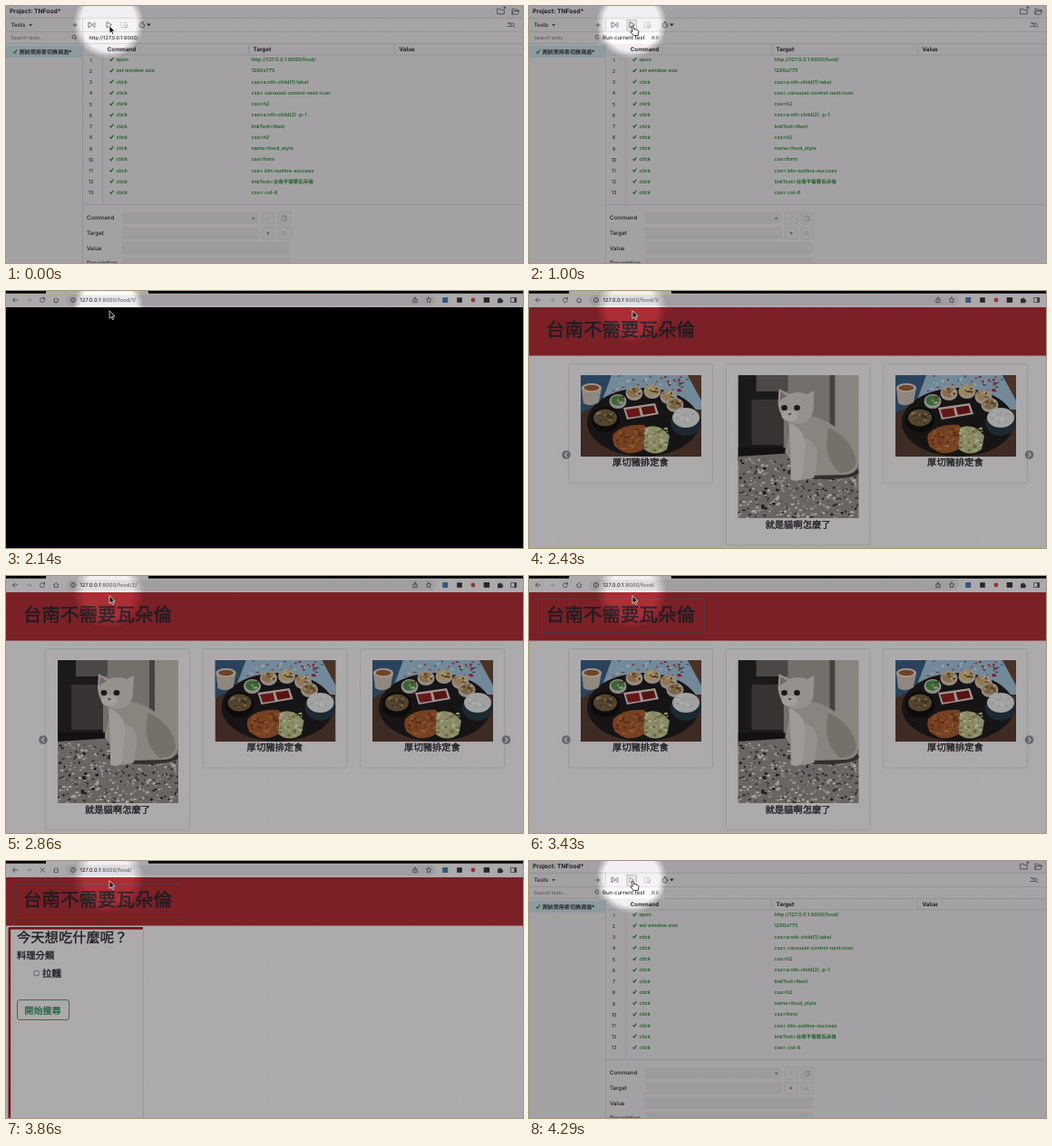
These frames come from a looping animation (570x284 px, 5.01 s). An HTML page:

```html
<!DOCTYPE html>
<html lang="zh-Hant">
<head>
<meta charset="utf-8">
<title>Test run</title>
<style>
html, body { margin: 0; width: 100%; height: 100%; overflow: hidden; background: #000; }
svg { display: block; width: 570px; height: 284px; }
text { font-family: Inter, "Noto Sans CJK TC", "Noto Sans CJK", sans-serif; fill: #2c2b31; white-space: pre; text-rendering: geometricPrecision; }
.heavy { stroke: #2c2b31; stroke-width: .35; }
.line { fill: none; stroke: #55535a; stroke-width: .75; stroke-linecap: round; stroke-linejoin: round; }
.rule { stroke: #cfcdd0; stroke-width: .7; }
</style>
</head>
<body>
<svg id="stage" viewBox="0 0 570 284"></svg>
<script>
const LOOP = 5010;
const SITE = '台南不需要瓦朵倫';

const text = (x, y, size, str, attrs = '') => `<text x="${x}" y="${y}" font-size="${size}" ${attrs}>${str}</text>`;
const rect = (x, y, w, h, fill, attrs = '') => `<rect x="${x}" y="${y}" width="${w}" height="${h}" fill="${fill}" ${attrs}/>`;
const oval = (x, y, rx, ry, fill) => `<ellipse cx="${x}" cy="${y}" rx="${rx}" ry="${ry}" fill="${fill}"/>`;
const path = (d, attrs = 'class="line"') => `<path d="${d}" ${attrs}/>`;
const shape = (d, fill) => path(d, `fill="${fill}"`);
const rule = d => path(d, 'class="rule" fill="none"');
const at = (x, y, content) => `<g transform="translate(${x} ${y})">${content}</g>`;
// Ranges are "from-to" in ms, separated by spaces.
const during = (ranges, content) => `<g data-times="${ranges}">${content}</g>`;
const bold = 'font-weight="700"', medium = 'font-weight="500"', heavy = 'class="heavy"', centered = 'text-anchor="middle"';

let seed = 7;
const random = () => (seed = seed * 16807 % 2147483647) / 2147483647;
const specks = (count, x, y, w, h, colors) => Array.from({ length: count }, (_, i) =>
  oval(x + random() * w, y + random() * h, .7 + random() * 1.5, .5 + random(), colors[i % colors.length])).join('');

function recorder() {
  const steps = [
    ['open', 'http://127.0.0.1:8000/food/'], ['set window size', '1280x775'],
    ...['css=a:nth-child(1) label', 'css=.carousel-control-next-icon', 'css=h2', 'css=a:nth-child(2) .p-1',
      'linkText=Next', 'css=h2', 'name=food_style', 'css=form', 'css=.btn-outline-success',
      'linkText=' + SITE, 'css=.col-8'].map(target => ['click', target])
  ];
  const green = 'style="fill:#2b8c38" font-weight="600"';
  const rows = steps.map(([command, target], i) => {
    const y = 61.2 + i * 12.23;
    return text(93.5, y + .5, 5.5, i + 1, centered)
      + path(`M114.6 ${y - 2.2}l1.3 1.6 2.5-3.4`, 'fill="none" stroke="#2b8c38" stroke-width="1.2"')
      + text(121.5, y, 5.5, command, green + ' font-style="italic"')
      + text(270.5, y, 5.5, target, green);
  }).join('');
  const field = (y, w) => rect(128, y, w, 13, '#e7e5e8', 'rx="1"');
  const button = (x, y) => rect(x, y, 14, 13, '#edebee', 'rx="1" stroke="#d8d6d9" stroke-width=".6"');
  const glyph = d => path(d, 'fill="none" stroke="#b9b7bb" stroke-width=".7"');
  const play = 'M111 18v6l5-3z';

  return rect(0, 0, 570, 284, '#f1eff1')
    + rect(85, 13, 485, 28, '#f5f3f5')
    + rect(0, 44, 84, 13, '#cfe6ed')
    + rule('M0 13.3H570M84.5 13V284M0 28.5H570M0 41.5H570M85 54H570M106.5 54V219M267.5 43V53M428.5 43V53M85 219.5H570')
    + text(4, 8.1, 6.7, 'Project: TNFood*', bold)
    + path('M542 3.2h2.7l.9 1.1h3.7v4.5H542zM548.6 1.8h2.4M549.8.6v2.4M558 8.8V3.2h2.7l.9 1.1h3.2v1.2M558 8.8l1.5-3.3h6.2l-1.5 3.3z')
    + text(5.5, 23.3, 6.2, 'Tests', medium) + shape('M25.2 20h3.8l-1.9 2.4z', '#55535a')
    + path('M74.2 21h4M76.2 19v4')
    + text(5.5, 37, 5.4, 'Search tests...', 'style="fill:#77757a"')
    + `<circle cx="75" cy="34.3" r="2" class="line"/>` + path('M76.5 35.8l1.3 1.3')
    + during('0-4000 4290-5010', path('M8 50.6l1.4 1.7 2.5-3.9', 'fill="none" stroke="#2b8c38" stroke-width="1.1"'))
    + text(14.5, 52.7, 6.1, '測試使用者切換頁面*', 'stroke="#2c2b31" stroke-width=".15"')
    + path('M91 18.3v5.4l4.4-2.7zM96.6 19h1.8M96.6 21h1.8M96.6 23h1.8')
    + during('140-1290 4290-5010', rect(108, 15.3, 10.5, 11.8, '#e6e5e8', 'stroke="#b2b0b5" stroke-width=".7"'))
    + during('0-4000', path(play))
    + during('4000-5010', path(play, 'fill="none" stroke="#aaa8ad" stroke-width=".8"'))
    + path('M126.5 18.4h1.4M129.5 18.4h4M126.5 21h1.4M129.5 21h3M126.5 23.6h2.4M133.5 20v3.6H130.5M131.7 22.3l-1.3 1.3 1.3 1.3', 'fill="none" stroke="#a5a3a8" stroke-width=".7"')
    + `<circle cx="150" cy="21.3" r="2.7" class="line"/>` + path('M150 21.3l1.5-1.7M149.2 17.5h1.6')
    + shape('M155.2 19.6h4.4l-2.2 2.8z', '#3d3b41')
    + path('M554 19h4.5q2 0 2 2M553 22.5h4.5M553.5 18.3l7.5 5.3')
    + text(91.5, 37, 5.4, 'http://127.0.0.1:8000/', medium)
    + text(111.7, 50, 6.3, 'Command', bold) + text(272.5, 50, 6.3, 'Target', bold) + text(433.5, 50, 6.3, 'Value', bold)
    + rows
    + ['Command', 'Target', 'Value', 'Description'].map((label, i) => text(89, 236.2 + i * 16.7, 6.2, label, medium)).join('')
    + field(228, 150) + field(244.5, 151) + field(261, 185) + field(277.7, 185)
    + shape('M270.7 233.7h3.8l-1.9 2.5z', '#8d8b90')
    + [228, 244.5].map(y => button(282, y) + button(300, y)).join('')
    + glyph('M287.5 236.5l3-4M304 232h4v5.5h-4zM306 234l3.5-2v5h-2.5M305.5 249.3a1.8 1.8 0 1 0 .1 0M307.2 252.3l1.8 1.8')
    + rect(287.8, 249.8, 2.4, 2.4, '#8d8b90')
    + during('290-1290 4290-5010', rect(77, 28.8, 72, 13.4, '#fff', 'rx="1.5" stroke="#e4e2e7" stroke-width=".6"')
      + text(81, 37.2, 6.1, 'Run current test', medium) + text(134, 37.2, 5.6, '⌘R', 'style="fill:#77757a"'));
}

function toolbar() {
  const address = (ranges, tail) => during(ranges, text(81.5, 12.2, 5.9,
    `127.0.0.1<tspan fill="#68666c">:8000${tail}</tspan>`, medium));
  return rect(0, 0, 570, 18, '#000') + rect(44, 0, 113, 4, '#fffbfd', 'rx="1"') + rect(0, 2.7, 570, 15.3, '#fffbfd')
    + rect(66, 4.2, 408, 11.8, '#edeaee', 'rx="5.9"')
    + path('M12.7 10H7.6M9.8 7.6L7.4 10l2.4 2.4M52.5 10l2.7-2.5 2.7 2.5M53.3 9.6v3h3.8v-3')
    + path('M22.8 10h5M25.5 7.6l2.4 2.4-2.4 2.4', 'fill="none" stroke="#bab8bd" stroke-width=".75"')
    + during('1290-1710 2140-3860', path('M42.1 8.4a2.6 2.6 0 1 0 .5 2.2M42.5 7.1v1.8h-1.8'))
    + during('1710-2140 3860-4000', path('M38 7.8l4.5 4.5M42.5 7.8L38 12.3'))
    + `<circle cx="74" cy="10" r="2.6" class="line"/>` + path('M74 9.8v1.5M74 8.5v.1')
    + address('1860-2140 3140-4000', '/food/') + address('2140-2860', '/food/1/') + address('2860-3140', '/food/2/')
    + path('M449.7 9.2h-.9v3.5h4.4V9.2h-.9M451 11V7M449.7 8.3L451 7l1.3 1.3M466 7l.9 1.9 2.1.3-1.6 1.5.4 2.1-1.8-1-1.8 1 .4-2.1-1.6-1.5 2.1-.3z')
    + rect(481.2, 7, 6, 6, '#4f7fc8') + rect(497.2, 7.2, 5.6, 5.6, '#38363b')
    + '<circle cx="515" cy="10" r="2.4" fill="#d6505a"/>' + rect(526.7, 7, 6.4, 5.8, '#38363b')
    + shape('M542 8.5h1.6a1.1 1.1 0 0 1 2.2 0h1.4V10a1.1 1.1 0 0 1 0 2.2v1h-5.2z', '#45434a')
    + path('M557 7.5h5.6v5H557z') + rect(560.4, 7.5, 2.3, 5, '#45434a');
}

const mealPhoto = rect(0, 0, 133, 90, '#5b3f33') + shape('M0 0H38L30 26 0 42z', '#3c638a')
  + shape('M34 0H118L133 26V38H20z', '#a9cbe2') + shape('M118 0H133V28z', '#6d4a38')
  + specks(46, 36, 1, 82, 18, ['#b23a40', '#e3eef4', '#4a76a4', '#c5524f'])
  + oval(69, 52, 62, 38, '#201e1f')
  + shape('M1 14L3 31Q12 36 20 30L23 14z', '#d5c8ba') + oval(12, 14, 11, 5, '#f0e4d4') + oval(12, 14, 8.5, 3.3, '#a5643a')
  + [[41, 29, '#4f9a50'], [59, 20, '#c9a06c'], [79, 18, '#e2c678'], [97, 24, '#d9b07c'], [104, 33, '#b4935c']]
    .map(([x, y, fill]) => oval(x, y, 9.5, 8, '#d9d0c6') + oval(x, y - 1, 7.6, 5.8, fill)
      + specks(10, x - 6, y - 5, 12, 7, ['#f2e6cb', '#7a5b36'])).join('')
  + shape('M47 36L82 31 86 43 51 49z', '#e8ded6') + shape('M49.5 38L64 36 66 45 52.5 47z', '#9c2022') + shape('M66.5 35.5L80.5 33.5 83 41.5 69 44z', '#821b1c')
  + oval(27, 49, 16, 14, '#12110f') + oval(27, 47, 13, 9.5, '#7b6543') + specks(22, 18, 41, 18, 11, ['#b89a66', '#4e4630'])
  + oval(116, 52, 17, 15, '#2a3d4a') + oval(116, 47, 15, 11, '#eff0f0') + specks(20, 105, 39, 20, 14, ['#c9cdd0', '#fff'])
  + shape('M36 65Q48 53 70 55L80 70Q70 88 50 86 32 80 36 65z', '#ad5f31') + specks(60, 39, 59, 34, 23, ['#d08a50', '#84401f', '#c2713c'])
  + shape('M71 58Q86 52 98 67L95 82Q82 91 70 82z', '#c9ca92') + specks(60, 71, 58, 25, 26, ['#f6f3d4', '#8f9a58', '#e6e2b0']);

const catPhoto = rect(0, 0, 133, 158, '#aaa49e') + rect(0, 0, 50, 95, '#282526') + rect(20, 0, 35, 18, '#6f6b68')
  + rect(15, 27, 35, 50, '#514b49') + rect(101, 0, 6, 96, '#68615c') + rect(107, 0, 26, 105, '#cbc4bb')
  + rect(0, 80, 52, 14, '#1c1a1b') + shape('M0 90L60 86 133 98V158H0z', '#9c9590')
  + specks(420, 0, 92, 133, 66, ['#eee7de', '#2c2929', '#cbc0b5', '#5a5350', '#fff8ef'])
  + oval(94, 107, 40, 8, '#4b4543')
  + shape('M60 48Q82 39 107 57 127 68 132 90 135 109 118 110L80 111 75 116H58L62 100 52 85z', '#c9c3bb')
  + shape('M100 58Q128 72 130 96 128 108 112 108 92 90 100 58z', '#aea69d')
  + shape('M56 52Q75 61 75 81L72 112Q66 120 58 115L58 88z', '#eae5de')
  + shape('M75 70Q90 76 87 95L84 113Q77 117 71 113z', '#dcd6ce')
  + shape('M44 31L45 15 56 21Q66 17 76 21L84 17 83 39Q80 54 63 54 46 51 44 31z', '#ddd7cf')
  + shape('M46 28L47 18 54 23z', '#a99a96') + oval(57, 45, 9, 6, '#f0ebe4')
  + oval(51, 36, 3.4, 3.1, '#292522') + oval(65, 36, 3.4, 3.1, '#292522') + oval(57, 43, 1.8, 1.2, '#a47573');

function page() {
  const card = (slot, isCat) => at(43.5 + slot * 173.5, 80.5,
    rect(0, 0, 159, isCat ? 200.5 : 131.5, 'none', 'rx="2" stroke="#e6e2e5" stroke-width="1"')
    + `<use href="#${isCat ? 'cat' : 'meal'}" x="13.5" y="12.5"/>`
    + text(79.5, isCat ? 181 : 112.5, 10.3, isCat ? '就是貓啊怎麼了' : '厚切豬排定食', centered + ' ' + heavy));
  const carousel = catSlot => [0, 1, 2].map(slot => card(slot, slot === catSlot)).join('')
    + [[41, -1], [551.5, 1]].map(([x, dir]) => oval(x, 181, 4.8, 4.8, '#99969b')
      + path(`M${x - dir} 178.5l${dir * 2.5} 2.5 ${-dir * 2.5} 2.5`, 'fill="none" stroke="#fff" stroke-width="1.3"')).join('');
  const search = rect(3, 73, 148, 2.6, '#b01924') + rect(2.5, 74, 2.6, 210, '#b01924') + rule('M151.3 75V284')
    + text(12, 90, 15.3, '今天想吃什麼呢？', heavy) + text(12, 108, 10.3, '料理分類', heavy)
    + rect(31, 121.5, 5.2, 5.2, '#fff', 'rx=".7" stroke="#77757a" stroke-width=".7"')
    + text(40, 128, 10.4, '拉麵', heavy)
    + rect(12.5, 153.5, 57, 22, 'none', 'rx="2.5" stroke="#4fa374" stroke-width="1"')
    + text(20.3, 168.6, 10.1, '開始搜尋', 'style="fill:#288956" stroke="#288956" stroke-width=".25"');

  return rect(0, 18, 570, 266, '#fffbfd')
    + during('2000-2430', rect(0, 18, 570, 266, '#000'))
    + during('2430-4000', rect(0, 18, 570, 53.5, '#b53038') + text(19, 50, 20.5, SITE, 'stroke="#2c2b31" stroke-width=".5"'))
    + during('3140-3570 3860-4000', rect(9.5, 25.5, 184, 37, 'none', 'rx="1" stroke="#765263" stroke-width="1"'))
    + during('2430-2860 3000-3570', carousel(1))
    + during('2860-3000', carousel(0))
    + during('3570-4000', search);
}

const arrow = path('M114 21.7v8.6l2-1.8 1.5 3 1.4-.7-1.5-2.8h2.7z', 'fill="#111" stroke="#fff" stroke-width=".7"');
const hand = path('M113.5 22.5q1.2-.8 1.8.5l.8 3 1.1-.3.9.6 1-.1.8.8q1 0 1 1.5l-.8 4.1h-4.7l-3.3-3.7q-.2-1.2 1.5-.7l.5.4z', 'fill="#fff" stroke="#111" stroke-width=".8"');

const spotlight = (id, edge, core) => `<radialGradient id="${id}" gradientUnits="userSpaceOnUse" cx="113" cy="19" r="39">
  <stop offset="${edge}" stop-opacity="${core}"/><stop offset="1" stop-opacity=".325"/></radialGradient>`;

const stage = document.getElementById('stage');
stage.innerHTML = `<defs>
    ${spotlight('brightSpot', .78, 0)}${spotlight('softSpot', .68, .05)}
    <clipPath id="frame">${rect(0, 0, 133, 158, '#000')}</clipPath>
    <clipPath id="wideFrame">${rect(0, 0, 133, 90, '#000')}</clipPath>
    <g id="cat" clip-path="url(#frame)">${catPhoto}</g>
    <g id="meal" clip-path="url(#wideFrame)">${mealPhoto}</g>
  </defs>`
  + during('0-1290 4000-5010', recorder())
  + during('1290-4000', page() + toolbar())
  + during('0-2430 4000-5010', rect(0, 0, 570, 284, 'url(#brightSpot)'))
  + during('2430-4000', rect(0, 0, 570, 284, 'url(#softSpot)'))
  + during('0-1000 1290-4290', arrow)
  + during('1000-1290 4290-5010', hand);

const timed = [...stage.querySelectorAll('[data-times]')].map(node => ({
  node, ranges: node.dataset.times.split(' ').map(range => range.split('-').map(Number))
}));

function draw() {
  const time = performance.now() % LOOP;
  for (const { node, ranges } of timed) {
    node.style.display = ranges.some(([from, to]) => time >= from && time < to) ? '' : 'none';
  }
  requestAnimationFrame(draw);
}
draw();
</script>
</body>
</html>
```
